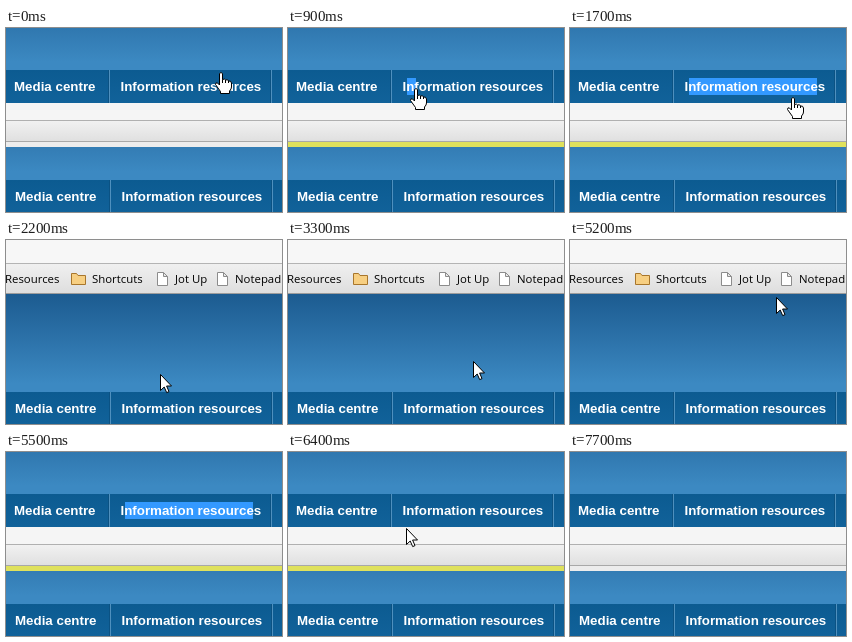
Write an HTML page with a canvas that moves like this. It is 276 px wide and 184 px high and loops after 7800 ms.

```html
<!DOCTYPE html>
<html lang="en">
<head>
<meta charset="utf-8">
<title>Selecting menu text</title>
<style>
html, body { margin: 0; width: 100%; height: 100%; overflow: hidden; }
canvas { display: block; }
</style>
</head>
<body>
<canvas id="stage" width="276" height="184"></canvas>
<script>
const ctx = document.getElementById('stage').getContext('2d');
const W = 276, LOOP = 7800, STEP = 100;
const MENU_FONT = 'bold 13.33px "Liberation Sans", Arial, sans-serif';
const MARK_FONT = '11.4px "Open Sans", "Noto Sans", sans-serif';

// Stops of the pointer tip: time, x, y
const stops = [
  [0, 215, 44], [800, 119, 60], [1400, 247, 60], [1700, 223, 69],
  [2200, 154, 134], [2700, 128, 160], [3200, 187, 118], [3600, 175, 136],
  [4300, 222, 111], [4700, 206, 63], [5200, 206, 57], [5700, 206, 4],
  [6400, 118, 76], [6700, 140, 56], [LOOP, 276, 29]
];

const arrow = new Path2D('M.5 .5V16.5L4.2 13L6.7 18.6L9 17.6L6.6 12H11.5Z');
const hand = new Path2D('M-1.5 1.5Q0 -.5 1.5 1.5V7.5Q4 6.5 4.5 8Q7 7 7.5 9Q10 8.5 10.5 11V15Q10.5 17 8.5 19V21.5H-.5V19.5L-5.5 12.5Q-5.5 10 -3.5 11L-1.5 13Z');
const knuckles = new Path2D('M1.5 7.5V11M4.5 8V11M7.5 9V11');
const sheet = new Path2D('M.5 .5H6.5V4.5H10.5V13.5H.5ZM6.5 .5L10.5 4.5');
const folder = new Path2D('M.5 12.5V1.5H5.5L7 3.5H14.5V12.5Z');

function rect(x, y, w, h, fill) {
  ctx.fillStyle = fill;
  ctx.fillRect(x, y, w, h);
}

function fade(y, h, from, to, top = y, bottom = y + h) {
  const g = ctx.createLinearGradient(0, top, 0, bottom);
  g.addColorStop(0, from);
  g.addColorStop(1, to);
  rect(0, y, W, h, g);
}

function text(str, x, y, font, fill) {
  ctx.font = font;
  ctx.fillStyle = fill;
  ctx.fillText(str, x, y);
}

function shape(path, x, y, fill, line) {
  ctx.save();
  ctx.translate(x, y);
  ctx.fillStyle = fill;
  ctx.fill(path);
  ctx.strokeStyle = line;
  ctx.stroke(path);
  ctx.restore();
}

// Blue header ending in the menu at y
function header(top, y) {
  fade(top, y - top, '#1c5b90', '#3c89c2', y - 98, y - 8);
}

function menu(y, dx, selected) {
  fade(y, 33, '#0c5b91', '#11629a');
  for (const x of [103, 265]) {
    rect(x + dx - 1, y, 1, 33, '#0b5283');
    rect(x + dx, y, 1, 33, '#4f90be');
  }
  if (selected > 119) rect(119, y + 8, selected - 119, 17, '#3399ff');
  text('Media centre', 8 + dx, y + 21, MENU_FONT, '#fff');
  text('Information resources', 114.5 + dx, y + 21, MENU_FONT, '#fff');
}

function bookmarks() {
  rect(0, 0, W, 23, '#f7f7f7');
  rect(0, 23, W, 1, '#b4b4b4');
  fade(24, 29, '#f0f0f0', '#dedede');
  rect(0, 53, W, 1, '#9c9c9c');
  const labels = { Resources: -1, Shortcuts: 86, 'Jot Up': 169, Notepad: 229 };
  for (const name in labels) text(name, labels[name], 43, MARK_FONT, '#000');
  shape(folder, 65, 32, '#f7cf82', '#a8762c');
  for (const x of [151, 211]) shape(sheet, x, 32, '#fff', '#8c8c8c');
}

function strip(yellow) {
  rect(0, 75, W, 17, '#f5f5f5');
  rect(0, 92, W, 1, '#b0b0b0');
  fade(93, 20, '#f1f1f1', '#e0e0e0');
  rect(0, 113, W, 1, '#a8a8a8');
  rect(0, 114, W, 5, yellow ? '#dfe15c' : '#ececec');
}

function pointAt(t) {
  const i = stops.findIndex(s => s[0] > t);
  const [t0, x0, y0] = stops[i - 1], [t1, x1, y1] = stops[i];
  const p = (t - t0) / (t1 - t0), ease = p * p * (3 - 2 * p);
  return [Math.round(x0 + (x1 - x0) * ease), Math.round(y0 + (y1 - y0) * ease)];
}

function pointer(x, y, overMenu) {
  shape(overMenu ? hand : arrow, x, y, '#fff', '#000');
  if (overMenu) shape(knuckles, x, y, 'transparent', '#000');
}

function draw(t) {
  const [x, y] = pointAt(t);
  const single = t >= 2000 && t < 5500;
  header(54, 152);
  menu(152, 1, 0);
  if (single) {
    bookmarks();
  } else {
    const selected = t < 900 || t >= 6200 ? 0 : t < 1400 ? x : 247;
    header(0, 42);
    menu(42, 0, selected);
    strip(t >= 900 && t < 7700);
  }
  const hidden = (t >= 5500 && t < 5700) || t >= 7500;
  const overMenu = single ? y >= 152 : y >= 42 && y < 75;
  if (!hidden) pointer(x, y, overMenu);
}

function frame(now) {
  draw(Math.floor(now % LOOP / STEP) * STEP);
  requestAnimationFrame(frame);
}
requestAnimationFrame(frame);
</script>
</body>
</html>
```
